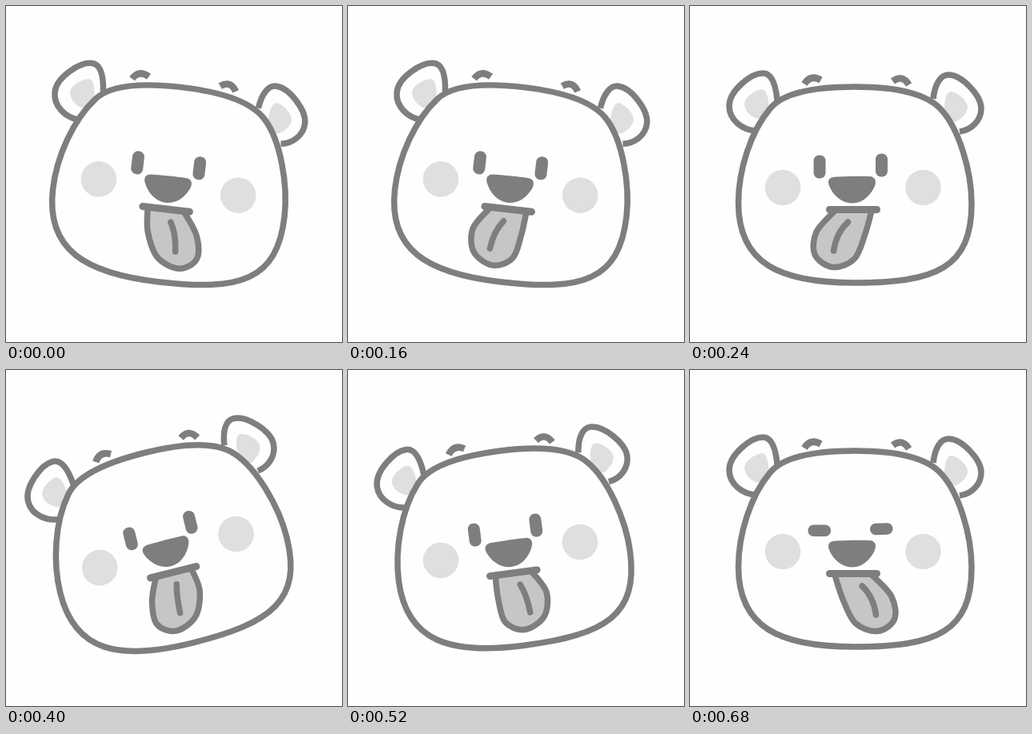
Animation, 420 px wide and 420 px high, one loop 0.76 s. Source, as an HTML page:

```html
<!DOCTYPE html>
<html lang="en">
<head>
<meta charset="utf-8">
<title>Bear wagging its tongue</title>
<style>
  html, body { margin: 0; width: 100%; height: 100%; overflow: hidden; background: #fefefe; }
  svg { display: block; width: 100%; height: 100%; }
  .line { fill: none; stroke: #7e7e7e; stroke-width: 7.5; }
  .skin { fill: #fefefe; }
  .dark { fill: #7e7e7e; }
  .soft { fill: #dfdfdf; }
  .round { stroke-linecap: round; }
  #tongue { fill: #c6c6c6; }
  #lip { stroke-width: 9; }
  #brows { stroke-width: 8.5; }
</style>
</head>
<body>
<svg viewBox="0 0 420 420">
  <g id="head">
    <path class="line skin" d="M109 118C107 96 101 84 91 84C76 84 49 106 49 125C49 143 66 155 82 156"/>
    <path class="line skin" d="M304 116C306 98 313 86 323 86C340 86 364 112 364 128C364 143 352 155 337 157"/>
    <path class="soft" d="M90 104C80 105 68 115 68 122C68 132 77 139 85 141L98 132C100 124 97 104 90 104Z"/>
    <path class="soft" d="M326 107C319 108 317 124 318 140L332 145C340 141 347 133 347 126C346 117 333 107 326 107Z"/>
    <path class="line skin" d="M206 101C258 101 295 109 313.5 129C336 153 352 206 352 247C352 327 308 346 206 346C112 346 60.500 322 60.500 246C60.500 205 76 157 99.500 129C115 109 155 101 206 101Z"/>
    <path id="brows" class="line" d="M143 97.500Q150.500 85 163.500 92.500M253.500 94Q265.500 85 273.500 98.500"/>
    <circle class="soft" cx="116" cy="227" r="22.3"/>
    <circle class="soft" cx="291.5" cy="227" r="22.3"/>
    <g id="open" class="dark">
      <rect x="154.5" y="186.500" width="15" height="29" rx="7"/>
      <rect x="232" y="184.500" width="15" height="29" rx="7"/>
    </g>
    <g id="shut" class="dark">
      <rect x="147.500" y="193.500" width="28.500" height="14.500" rx="7"/>
      <rect x="225" y="191.500" width="28.500" height="14.500" rx="7" transform="rotate(-2 239 199)"/>
    </g>
    <path class="dark" d="M183 213.500C195 213 212 212.500 224 213C233 213 234 221 229 229C222 241 213 246.500 202 246.500C190 246.500 179 237 174 225C171 217 175 213.500 183 213.500Z"/>
    <path id="tongue" class="line"/>
    <path id="crease" class="line round"/>
    <path id="lip" class="line round" d="M174.500 254.500H233.500"/>
  </g>
</svg>
<script>
const $ = id => document.getElementById(id);
const LOOP = 760, STEP = 80, HOLD = 40;
const CX = 204, CY = 227, ROOT_Y = 256, LENGTH = 70.5;
const tilts = [6.6, 10, 6.6, 0, -7.5, -13.9, -7.5, 0, 0];

// Pendulum position in step k; the peak comes at step `peak` of nine.
const wag = (k, peak) => Math.cos((k - peak) * 2 * Math.PI / 9);

// Point at depth d (0 root, 1 tip), `side` px from the centre line.
// Deeper parts swing further and later.
function tonguePoint(k, d, side) {
  const sway = Math.pow(d, 0.6) * (29 * wag(k, 7.4 + 0.7 * d) + 1.5);
  const lean = d * 0.12 * wag(k, 8.1);
  return [CX + sway + side, ROOT_Y + LENGTH * d - side * lean];
}

// Smooth open curve through the points.
function spline(p) {
  const at = i => p[Math.max(0, Math.min(p.length - 1, i))];
  let d = "M" + p[0];
  for (let i = 0; i < p.length - 1; i++) {
    const [a, b, c, e] = [at(i - 1), at(i), at(i + 1), at(i + 2)];
    const c1 = b.map((v, n) => v + (c[n] - a[n]) / 6);
    const c2 = c.map((v, n) => v - (e[n] - b[n]) / 6);
    d += `C${c1} ${c2} ${c}`;
  }
  return d;
}

function tonguePath(k) {
  const widths = [[0, 23], [0.4, 30.5], [0.82, 24.5]];
  const edge = sign => widths.map(([d, w]) => tonguePoint(k, d, sign * w));
  return spline([...edge(-1), tonguePoint(k, 1, 0), ...edge(1).reverse()]);
}

function creasePath(k) {
  const x = reach => CX + 2.5 + reach * wag(k, 7.6);
  return `M${x(9)} 270Q${x(24)} 284 ${x(27)} 306`;
}

function show(k) {
  const tilt = tilts[k], size = Math.abs(tilt), shut = k === 8;
  $("head").setAttribute("transform",
    `translate(${-0.1 * size} ${-0.07 * size}) rotate(${tilt} ${CX} ${CY})`);
  $("tongue").setAttribute("d", tonguePath(k));
  $("crease").setAttribute("d", creasePath(k));
  $("open").style.display = shut ? "none" : "";
  $("shut").style.display = shut ? "" : "none";
}

// Steps are even, with one longer rest at the far left tilt.
function stepAt(t) {
  const rest = Math.max(0, Math.min(HOLD, t - 5.5 * STEP));
  return Math.floor((t - rest) / STEP);
}

const start = performance.now();
let current = -1;
function tick() {
  const k = stepAt(Math.max(0, performance.now() - start) % LOOP);
  if (k !== current) show(current = k);
  requestAnimationFrame(tick);
}
tick();
</script>
</body>
</html>
```
